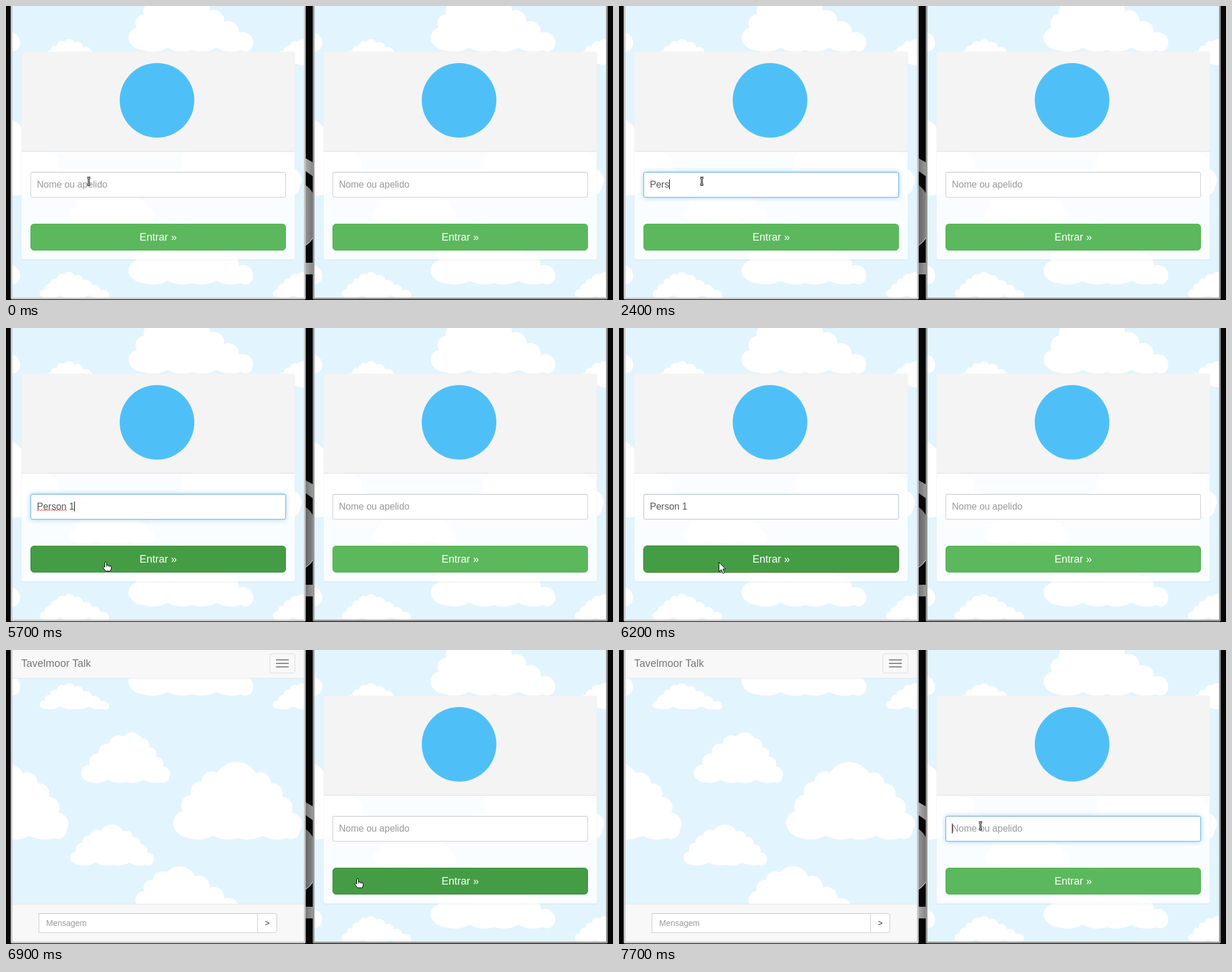
These frames come from a looping animation (1041x505 px, 8 s). An HTML page:

```html
<!DOCTYPE html>
<html lang="pt">
<head>
<meta charset="utf-8">
<title>Sala de conversa</title>
<style>
html, body { margin: 0; width: 100%; height: 100%; overflow: hidden; background: #070707; }
body { position: relative; font-family: "Liberation Sans", Arial, sans-serif; }
body *, body *::before { box-sizing: border-box; }
svg, .phone, .phone div, .caret { position: absolute; }
svg { display: block; overflow: visible; }
#gap { --near: #aaa; --far: #888; left: 0; top: 0; }
#gap.shaded { --near: #777; --far: #999; }

.phone { top: 0; width: 506px; height: 504px; border: 3px solid #c6c6c6; border-top: 0;
  border-radius: 0 0 3px 3px; background: #e2f4fe; }
#left { left: 8px; }
#right { left: 526px; border-color: #969696; }
.phone .screen { inset: 0; overflow: hidden; }
.sky { left: 0; top: 0; overflow: hidden; }

.panel { left: 15px; top: 78px; width: 470px; height: 358px; border: 1px solid rgba(240,240,240,.5);
  border-radius: 4px; background: rgba(255,255,255,.8); background-clip: padding-box;
  box-shadow: 0 1px 1px rgba(0,0,0,.05); }
.head { left: 0; top: 0; width: 468px; height: 171px; background: #f4f4f4;
  border-bottom: 1px solid #ddd; border-radius: 3px 3px 0 0; }
.badge { left: 168px; top: 19px; width: 128px; height: 128px; border-radius: 50%; background: #4fc0f7; }
.field { --f: 0; left: 31px; top: 285px; width: 438px; height: 44px; padding-left: 10px;
  border: 1px solid; border-color: color-mix(in srgb, #66afe9 calc(var(--f) * 100%), #ccc);
  border-radius: 3px; background: #fff; font-size: 16px; line-height: 42px; color: #555; white-space: pre;
  box-shadow: inset 0 1px 1px rgba(0,0,0,.075), 0 0 8px rgba(102,175,233,calc(var(--f) * .9 - .3)); }
.hint { color: #999; }
.caret { top: 12px; width: 1px; height: 17px; background: #000; }
.wave { left: 10px; top: 25px; overflow: hidden; }
.enter { left: 31px; top: 374px; width: 438px; height: 46px; border: 1px solid #4cae4c; border-radius: 6px;
  background: #5cb85c; color: #fff; font-size: 18px; line-height: 44px; text-align: center; }
.enter.over { background: #449d44; border-color: #398439; }
.enter.pressed { outline: 1px solid #c4c0a2; }

.nav { left: 0; top: 0; width: 500px; height: 49px; background: #f8f8f8; border-bottom: 1px solid #e7e7e7;
  padding: 13px 15px; font-size: 18px; line-height: 20px; color: #777; }
.menu { left: 441px; top: 6px; width: 44px; height: 34px; border: 1px solid #ddd; border-radius: 4px; }
.menu::before { content: ""; position: absolute; left: 10px; top: 9px; width: 22px; height: 2px;
  background: #888; box-shadow: 0 6px #888, 0 12px #888; }
.foot { left: 0; top: 436px; width: 500px; height: 65px; background: #f8f8f8; border-top: 1px solid #e7e7e7;
  font-size: 14px; line-height: 32px; }
.msg, .send { top: 15px; height: 34px; border: 1px solid #ccc; background: #fff; }
.msg { left: 45px; width: 376px; padding-left: 12px; color: #999; box-shadow: inset 0 1px 1px rgba(0,0,0,.075); }
.send { left: 420px; width: 34px; border-radius: 0 4px 4px 0; color: #333; text-align: center; }
[hidden] { display: none !important; }
#cursor { left: 0; top: 0; }
#cursor g { display: none; }
#cursor.arrow .arrow, #cursor.hand .hand, #cursor.beam .beam { display: inline; }
</style>
</head>
<body>
<svg id="gap" width="1041" height="505">
  <defs>
    <linearGradient id="shade" gradientUnits="userSpaceOnUse" x1="514" x2="526" y1="0" y2="0">
      <stop offset="0" stop-color="#aaa" style="stop-color: var(--near)"/>
      <stop offset="1" stop-color="#888" style="stop-color: var(--far)"/>
    </linearGradient>
    <g id="clouds" fill="#fff"></g>
    <path id="stem" d="M-3-6H-1L0-5 1-6H3M0-5V5M-3 6H-1L0 5 1 6H3"/>
  </defs>
  <g fill="url(#shade)">
    <path d="M513 261L527 269V293L513 283ZM513 441H527V461H513Z"/>
    <path d="M513 307Q522 313 527 323V398Q522 407 513 412Z" opacity=".85"/>
  </g>
  <path d="M514 411Q522 406 527 397" fill="none" stroke="#ddd"/>
</svg>
<div class="phone" id="left"></div>
<div class="phone" id="right"></div>
<svg id="cursor" class="beam" width="1" height="1">
  <g class="arrow"><path d="M.5 .5V16.5L4.3 13 7.3 19.5 10 18.3 7 12H11.7Z" fill="#fff" stroke="#000"/></g>
  <g class="hand" fill="#fff" stroke="#000">
    <path d="M-1.5 9V1.5Q-1.5 0 0 0T1.5 1.5V5.5Q3.2 4.4 4.4 6 6 5.2 7 6.6 9.4 6 9.6 8.2V11L8 15.5H0L-4.5 9.6Q-4.5 7.4-2.6 8Z"/>
    <path d="M1.5 5.5V8.5M4.4 6V8.5M7 6.6V9" stroke-width=".8"/>
  </g>
  <g class="beam" fill="none">
    <use href="#stem" stroke="#000" stroke-width="3"/>
    <use href="#stem" stroke="#fff"/>
  </g>
</svg>
<script>
const $ = s => document.querySelector(s);
const LOOP = 8000, STEP = 100, TILE = 400, SHIFT = 518;
const clamp = v => Math.min(1, Math.max(0, v));
const range = n => [...Array(n).keys()];

// A slope falls from the peak as u^p; bumps are spread evenly along it.
function slope(peak, end, top, h, p, n = 5) {
  return range(n).map(i => {
    const u = ((i + .5) / (n - .5)) ** (2 / (1 + p));
    return [peak + (end - peak) * u, top + h * (.08 + .8 * u ** p)];
  });
}

function cloud({ left, right, top, base, peak, pl, pr }) {
  const h = base - top;
  const crown = [...slope(peak, left + 4, top, h, pl).reverse(), ...slope(peak, right - 4, top, h, pr)];
  const belly = range(5).map(i => [right + (left - right) * (i + .6) / 5.2, base - 2 - i % 2 * 4]);
  const pts = [...crown, ...belly];
  return '<path d="' + pts.reduce((d, [x, y], i) => {
    const [nx, ny] = pts[(i + 1) % pts.length];
    const r = Math.hypot(nx - x, ny - y) * (i < crown.length ? .58 : 1.3);
    return d + `A${r} ${r} 0 0 1 ${nx} ${ny}`;
  }, 'M' + pts[0]) + 'Z"/>';
}

$('#clouds').innerHTML = [
  { left: 210, right: 428, top: -29, base: 78, peak: 312, pl: 3.5, pr: 1 },
  { left: 54, right: 181, top: 55, base: 103, peak: 110, pl: 1.7, pr: 1 },
  { left: 126, right: 284, top: 138, base: 229, peak: 225, pl: 2.2, pr: 1.2 },
  { left: 287, right: 508, top: 197, base: 325, peak: 402, pl: 3.3, pr: 2.3 },
  { left: 108, right: 257, top: 303, base: 371, peak: 188, pl: 3, pr: 1.8 }
].map(cloud).join('');

const copies = [-TILE, 0, TILE].flatMap(x => [0, TILE].map(y => `<use href="#clouds" x="${x}" y="${y}"/>`)).join('');
const sky = `<svg class="sky" width="500" height="501" viewBox="11 0 500 501">${copies}</svg>`;
const login = `<div class="login">
  <div class="panel"><div class="head"><div class="badge"></div></div></div>
  <div class="field"><span class="typed"></span><i class="caret"></i><span class="hint">Nome ou apelido</span>
    <svg class="wave" width="51" height="4"><path d="M0 .8${'l2 2 2-2'.repeat(13)}" fill="none" stroke="#f22"/></svg></div>
  <div class="enter">Entrar »</div></div>`;
const chat = `<div class="chat">
  <div class="nav">Tavelmoor Talk<div class="menu"></div></div>
  <div class="foot"><div class="msg">Mensagem</div><div class="send">&gt;</div></div></div>`;

$('#left').innerHTML = `<div class="screen">${sky}${login}${chat}</div>`;
$('#right').innerHTML = `<div class="screen">${sky}${login}</div>`;

const FOCUS = 400, BLUR = 6100, LOADING = 6200, CHAT = 6300, REFOCUS = 7600;
const NAME = 'Person 1';
const keyTimes = [1600, 1800, 2000, 2400, 3300, 3300, 3900, 4400];
const caretResets = [FOCUS, 1600, 2000, 2500, 3100, 3900, 4400];
const stops = [[5100, 142, 301], [5400, 174, 408], [5500, 174, 408], [5700, 171, 402],
  [6500, 171, 402], [6900, 603, 393], [7400, 620, 302]];

const fade = (t, from, ms) => clamp((t - from + STEP) / ms);
const blink = (t, reset) => (t - reset) % 1200 < 600;

function mouse(t) {
  return [1, 2].map(axis => stops.slice(1).reduce((v, stop, i) => {
    const k = clamp((t - stops[i][0]) / (stop[0] - stops[i][0]));
    return v + (stop[axis] - stops[i][axis]) * k * k * (3 - 2 * k);
  }, stops[0][axis])).map(Math.round);
}

function target(x, y, dx) {
  if (x < 42 + dx || x > 480 + dx) return '';
  return y >= 285 && y < 329 ? 'beam' : y >= 374 && y < 420 ? 'hand' : '';
}

function setForm(id, { text = '', focus, caret, over, pressed = false, wave = false }) {
  const part = c => $(`${id} .${c}`);
  part('typed').textContent = text;
  part('hint').hidden = text !== '';
  part('wave').style.display = wave ? '' : 'none';
  part('caret').hidden = !caret;
  part('field').style.setProperty('--f', focus);
  part('enter').classList.toggle('over', over);
  part('enter').classList.toggle('pressed', pressed);
}

function render(t) {
  const [x, y] = mouse(t);
  const onLeft = t < LOADING ? target(x, y, 0) : '';
  const onRight = target(x, y, SHIFT);
  const editing = t >= FOCUS && t < BLUR;
  const text = NAME.slice(0, keyTimes.filter(k => k <= t).length);

  setForm('#left', {
    text,
    focus: fade(t, FOCUS, 200) * (1 - fade(t, BLUR, 300)),
    caret: editing && blink(t, caretResets.findLast(r => r <= t)),
    over: onLeft === 'hand' || t >= LOADING,
    pressed: t >= BLUR,
    wave: editing && text.includes(' ')
  });
  setForm('#right', {
    focus: fade(t, REFOCUS, 200),
    caret: t >= REFOCUS,
    over: onRight === 'hand'
  });
  $('#left .login').hidden = t >= CHAT;
  $('#left .chat').hidden = t < CHAT;

  // The active window casts the deeper shadow into the gap.
  $('#gap').classList.toggle('shaded', t >= FOCUS && t < REFOCUS);

  const cursor = $('#cursor');
  cursor.setAttribute('class', onLeft || onRight || 'arrow');
  cursor.style.transform = `translate(${x}px, ${y}px)`;
}

let start, shown = -1;
function tick(now) {
  start ??= now;
  const t = Math.floor((now - start) % LOOP / STEP) * STEP;
  if (t !== shown) render(shown = t);
  requestAnimationFrame(tick);
}
render(0);
requestAnimationFrame(tick);
</script>
</body>
</html>
```
